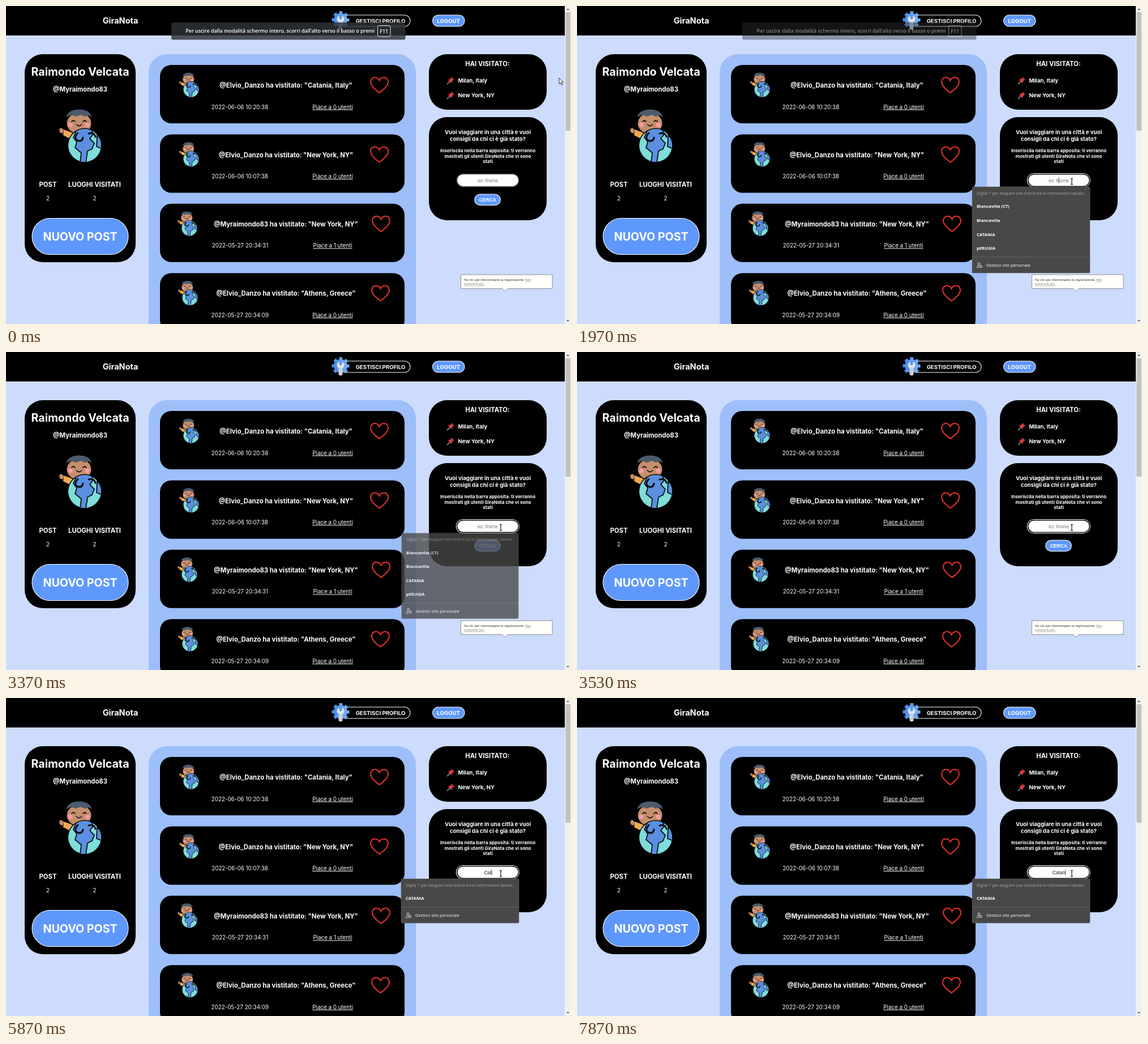
These frames come from a looping animation (998x561 px, 8000 ms). An HTML page:

```html
<!DOCTYPE html>
<html lang="it">
<head>
<meta charset="utf-8">
<style>
  html, body { margin: 0; width: 100%; height: 100%; overflow: hidden; background: #cddcfd; }
  svg { display: block; width: 998px; height: 561px; font-family: Inter, sans-serif; font-optical-sizing: none; }
  .ui { font-family: "Open Sans", sans-serif; }
  .field { font-family: "Liberation Sans", Arial, sans-serif; }
  .tip { font-family: "DejaVu Sans", sans-serif; }
</style>
</head>
<body>
<svg id="stage" viewBox="0 0 998 561">
  <defs>
    <linearGradient id="steel" x2="1"><stop stop-color="#4a8cea"/><stop offset="1" stop-color="#74b0f2"/></linearGradient>
    <clipPath id="globe"><circle cx="45" cy="64" r="29"/></clipPath>
    <g id="buddy">
      <path d="M0 35 4 33 8 37 6 43 1 41Z" fill="#c68e6b"/>
      <path d="M8 36 22 41 19 52 7 46Z" fill="#f2a851"/>
      <path d="M18 42H52V54H20Z" fill="#f2a851"/>
      <ellipse cx="35" cy="25" rx="21.500" ry="18.500" fill="#c68e6b"/>
      <path d="M12.500 14C15 4 24 .5 35 .5S55 4 57.500 14L52 11 45 13 38 10 29 13 21 10Z" fill="#4c5b6c"/>
      <g fill="#f49ca6"><circle cx="20" cy="27.500" r="4"/><circle cx="49.500" cy="27.500" r="4"/></g>
      <path d="M22 22q3-4 6 0M42 22q3-4 6 0M30.500 27q4.500 5 9 0" fill="none" stroke="#16181c" stroke-width="1.800" stroke-linecap="round"/>
      <circle cx="45" cy="64" r="30.500"/>
      <g clip-path="url(#globe)">
        <rect x="15" y="34" width="60" height="60" fill="#7edcd9"/>
        <path d="M32 34H56L60 44 54 52 62 60 58 70 50 74 47 94H37L39 77 28 68 31 58 25 50ZM67 46 76 56V70L66 66Z" fill="#5b8fe0" stroke="#0b0d12" stroke-width="1.800"/>
        <path d="M33 42q-9 10 1 14 7 1 8-6M52 43q10-3 12 6" fill="none" stroke="#0b0d12" stroke-width="3" stroke-linecap="round"/>
      </g>
    </g>
    <path id="heart" d="M16.500 28C12 24.500 1 17.500 1 9 1 4 4.500 1 8.500 1 12 1 15 3 16.500 6.500 18 3 21 1 24.500 1 28.500 1 32 4 32 9 32 17.500 21 24.500 16.500 28Z" fill="none" stroke="#ea342b" stroke-width="2"/>
    <g id="pin">
      <path d="M5.500 7.500 0 13" stroke="#aab4bd" stroke-width="1.200"/>
      <path d="M1.500 5 4 4.500 7.500 2 8 0 13 5 11 5.500 8.500 9 8 11.500Z" fill="#dd3a41"/>
      <path d="M8 0 13 5 11.500 5.500 7.500 1.500Z" fill="#a9222d"/>
    </g>
  </defs>
</svg>
<script>
const stage = document.getElementById('stage');
const LOOP = 8000, BLUE = '#5f98fd';
// type scale: title, subtitle, heading, bold body, body, small
const H1 = 19.65, H2 = 14.5, H3 = 11.3, BOLD = 9.65, BODY = 9.8, SMALL = 8.1;

const box = (x, y, w, h, r, fill = '#000', extra = '') =>
  `<rect x="${x}" y="${y}" width="${w}" height="${h}" rx="${r}" fill="${fill}" ${extra}/>`;
// y is the middle of the capital letters
const text = (x, y, str, size, weight = 700, extra = '', fill = '#fff') =>
  `<text x="${x}" y="${y + size * .364}" font-size="${size}" font-weight="${weight}" fill="${fill}" text-anchor="middle" ${extra}>${str}</text>`;
const left = 'style="text-anchor:start"';
const rim = 'stroke="#fff" stroke-width="1.1"';
const use = (id, x, y, scale = 1) => `<use href="#${id}" transform="translate(${x} ${y}) scale(${scale})"/>`;

function post(i, title, date, likes, dx) {
  const y = 104 + i * 122.4;
  return box(272, y, 432, 103, 20) + use('buddy', 306 - dx, y + 13.5, .465) +
    text(494.5, y + 36, title, H3) + use('heart', 643 + dx, y + 21) +
    text(413 + dx / 6, y + 74, date, BODY, 400) +
    text(577, y + 74, `Piace a ${likes} utenti`, BODY, 400, 'text-decoration="underline"');
}

function popup(id, names) {
  const bottom = names.length > 1 ? 443 : 369, foot = bottom + 14.5;
  return `<g id="${id}" class="ui">` +
    box(698, 319, 208, bottom + 28 - 319, 2, '#484847', 'stroke="#666" stroke-width=".6"') +
    text(706, 330, "Digita '/' per eseguire una ricerca tra le informazioni salvate.", 6.87, 400, left, '#a9a9a9') +
    names.map((n, i) => text(706, 353.5 + i * 24.7, n, 7.6, 700, left)).join('') +
    `<path d="M698 ${bottom}h208" stroke="#6b6b6b" stroke-width=".8"/>
     <g fill="none" stroke="#e4e4e4" stroke-width=".9"><circle cx="710" cy="${foot - 2.5}" r="2.1"/>
     <path d="M710 ${foot + 4}h-3.5q0-4 4-4"/><rect x="711.5" y="${foot + .5}" width="3.5" height="3"/></g>` +
    text(723, foot, 'Gestisci sito personale', 7.45, 400, left) + '</g>';
}

stage.innerHTML += [
  // header
  box(0, 0, 987, 52, 0),
  text(202, 26, 'GiraNota', H2),
  box(590, 16, 124, 20, 10, '#000', rim),
  text(661.5, 26, 'GESTISCI PROFILO', BOLD),
  `<circle cx="591" cy="24.5" r="12.8" fill="none" stroke="url(#steel)" stroke-width="5.5" stroke-dasharray="5.6 4.45" stroke-dashoffset="2.8"/>
   <circle cx="591" cy="24.5" r="12" fill="url(#steel)"/>
   <circle cx="591" cy="23" r="6.5" fill="#e3e6ea"/>
   <rect x="587.5" y="27" width="7" height="14.5" rx="3" fill="#cdd1d8"/>
   <path d="M588.5 15h5v7l-2.5 2-2.5-2Z" fill="#5b9aec"/>`,
  box(753.5, 16, 56.5, 20, 10, BLUE, rim),
  text(781.7, 26, 'LOGOUT', BOLD),
  // profile
  box(33, 85, 196, 367, 32),
  text(131, 116, 'Raimondo Velcata', H1),
  text(131, 147, '@Myraimondo83', H3),
  use('buddy', 94, 182),
  text(74, 315, 'POST', H3), text(156.5, 315, 'LUOGHI VISITATI', H3),
  text(74, 339, '2', BODY, 400), text(156.5, 339, '2', BODY, 400),
  box(46, 374.5, 170, 64, 32, BLUE, rim),
  text(131, 407, 'NUOVO POST', H1),
  // feed
  box(252, 85, 472, 520, 32, '#9dbef8'),
  post(0, '@Elvio_Danzo ha vistitato: "Catania, Italy"', '2022-06-06 10:20:38', 0, 0),
  post(1, '@Elvio_Danzo ha vistitato: "New York, NY"', '2022-06-06 10:07:38', 0, 0),
  post(2, '@Myraimondo83 ha vistitato: "New York, NY"', '2022-05-27 20:34:31', 1, 3),
  post(3, '@Elvio_Danzo ha vistitato: "Athens, Greece"', '2022-05-27 20:34:09', 0, 2),
  // side cards
  box(747, 85, 208, 98, 32),
  text(850.5, 102, 'HAI VISITATO:', H3),
  use('pin', 779, 125), text(798.5, 131, 'Milan, Italy', BOLD, 700, left),
  use('pin', 779, 151), text(798.5, 157, 'New York, NY', BOLD, 700, left),
  box(747, 196, 208, 182, 32),
  text(851, 222, 'Vuoi viaggiare in una città e vuoi', BOLD),
  text(851, 234, 'consigli da chi ci è già stato?', BOLD),
  text(851, 255, 'Inseriscila nella barra apposita: ti verranno', SMALL),
  text(851, 264.8, 'mostrati gli utenti GiraNota che vi sono', SMALL),
  text(851, 274.5, 'stati', SMALL),
  box(827.8, 332, 45.5, 19.5, 9.7, BLUE, rim),
  text(850.7, 341.7, 'CERCA', 8.6, 700, 'class="field"'),
  '<g id="focus">', box(795.3, 295.5, 111, 24, 12, '#000', rim), '</g>',
  box(796.7, 296.7, 108.6, 21.5, 10.7, '#fff', 'id="input" stroke-width="1.4"'),
  text(851, 307.5, '', 8.45, 400, 'class="field" id="typed"'),
  '<path id="caret" d="M0 302.5v10" stroke="#000" stroke-width=".7"/>',
  // scrollbar
  box(987, 0, 11, 561, 0, '#f1f1f1'), box(988.3, 11, 8.7, 209, 0, '#c1c1c1'),
  '<path d="M990 7 992.5 4.3 995 7ZM990 554 992.5 556.7 995 554Z" fill="#555"/>',
  // recorder hint
  '<g id="hint" class="tip"><path d="M803.5 474H965V498.5H886L881 503.5 876.5 498.5H803.5Z" fill="#fffffb" stroke="#777" stroke-width=".8"/>',
  text(809, 483.5, 'Fai clic per interrompere la registrazione. <tspan fill="#777" text-decoration="underline">Non</tspan>', 5.2, 400, left, '#222'),
  text(809, 490.3, 'mostrarlo più.', 5.2, 400, left + ' text-decoration="underline"', '#777'), '</g>',
  popup('full', ['Biancavilla (CT)', 'Biancavilla', 'CATANIA', 'pERUGIA']),
  popup('short', ['CATANIA']),
  // fullscreen notice
  '<g id="notice" class="ui">', box(292, 29, 413.5, 30.5, 3, '#2f3337', 'fill-opacity=".82"'),
  text(484.3, 44, "Per uscire dalla modalità schermo intero, scorri dall'alto verso il basso o premi", 8.9, 600),
  box(656.5, 34.5, 22.5, 19.5, 2, 'none', 'stroke="#ddd"'),
  text(667.7, 44.3, 'F11', 8.9, 600), '</g>',
  '<path id="arrow" d="M0 0V10.5L2.5 8.3 4.2 12.2 5.9 11.5 4.2 7.7H7.5Z" fill="#fff" stroke="#000" stroke-width=".8"/>',
  '<path id="beam" d="M-2-5.5Q0-5.5 0-4.5 0-5.5 2-5.5M0-4.5V4.5M-2 5.5Q0 5.5 0 4.5 0 5.5 2 5.5" fill="none" stroke="#000" stroke-width="1.1"/>'
].join('');

const $ = id => document.getElementById(id);
const ramp = (t, a, b) => Math.min(1, Math.max(0, (t - a) / (b - a)));
const show = (id, on) => $(id).setAttribute('opacity', +on);
const move = (id, x, y) => $(id).setAttribute('transform', `translate(${x} ${y})`);
const bezier = (p, a, b, c, d) =>
  (1 - p) ** 3 * a + 3 * p * (1 - p) ** 2 * b + 3 * p * p * (1 - p) * c + p ** 3 * d;

const typing = [[1680, ''], [5570, 'C'], [5700, 'Ca'], [5870, 'Cat'], [6570, 'Catn'],
  [7300, 'Cat'], [7830, 'Cata'], [7870, 'Catan']];

function pop(id, o, cy) {
  const s = .96 + .04 * o;
  show(id, o);
  $(id).setAttribute('transform', `translate(802 ${cy}) scale(${s}) translate(-802 ${-cy})`);
}

function draw(now) {
  const t = now % LOOP;

  // pointer travels into the field and becomes a text cursor
  const q = ramp(t, 630, 1430), p = q * q * (3 - 2 * q);
  const x = bezier(p, 977, 950, 873, 874), y = bezier(p, 127, 290, 390, 309.5);
  const inField = x < 906 && y > 296 && y < 319;
  move('arrow', x, y);
  move('beam', x, y);
  show('arrow', !inField);
  show('beam', inField);

  // input, with a caret that blinks anew after each key
  const focused = t >= 1670;
  show('focus', focused);
  $('input').setAttribute('stroke', focused ? '#101010' : '#858585');
  const [since, word] = typing.filter(k => k[0] <= t).pop() || [0, ''];
  const typed = $('typed');
  const label = word || 'es: Rome';
  if (typed.textContent !== label) typed.textContent = label;
  typed.setAttribute('fill', word ? '#222' : '#777');
  move('caret', word ? 851.5 + typed.getComputedTextLength() / 2 : 851, 0);
  show('caret', since && Math.floor((t - since) / 530) % 2 === 0);

  pop('full', ramp(t, 1670, 1800) * (1 - ramp(t, 3330, 3520)), 395);
  pop('short', ramp(t, 5570, 5700) * (1 - ramp(t, 6570, 6780)) + ramp(t, 7290, 7430), 358);
  show('notice', (1 - ramp(t, 1670, 2470)) ** 1.4);
  show('hint', t < 4630);
  requestAnimationFrame(draw);
}
requestAnimationFrame(draw);
</script>
</body>
</html>
```
